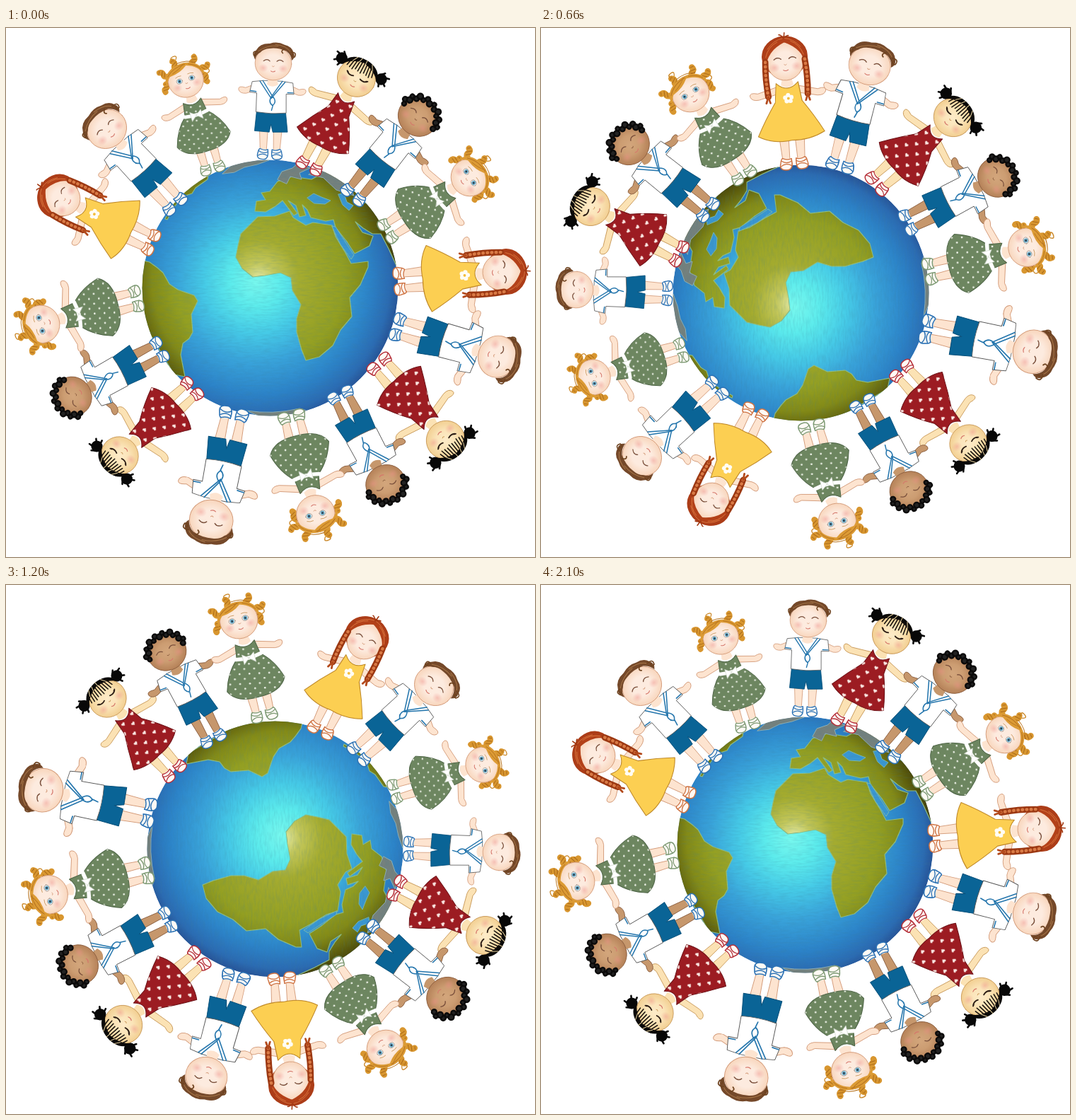
Write an HTML page that moves like this. It is 748x748 px and loops after 2.4 s.

```html
<!DOCTYPE html>
<html lang="en">
<head>
<meta charset="utf-8">
<title>Children around the world</title>
<style>
  html, body { margin: 0; width: 100%; height: 100%; overflow: hidden; background: #fff; }
  svg { display: block; width: 100vw; height: 100vh; transform-origin: 50% 50%; }
</style>
</head>
<body>
<svg id="world" viewBox="0 0 748 748" xmlns="http://www.w3.org/2000/svg" stroke-linecap="round" stroke-linejoin="round"></svg>
<script>
const FAIR = { skin: '#fde4d0', edge: '#d39a78', face: 'url(#fairFace)' };
const PALE = { skin: '#fbe2b4', edge: '#c99a5a', face: 'url(#paleFace)' };
const DARK = { skin: '#c6976c', edge: '#8d6040', face: 'url(#darkFace)' };

const path = (d, fill, stroke = 'none', width = 1, extra = '') =>
  `<path d="${d}" fill="${fill}" stroke="${stroke}" stroke-width="${width}" ${extra}/>`;
const line = (d, stroke, width = 1, extra = '') => path(d, 'none', stroke, width, extra);
const oval = (x, y, rx, ry, fill, extra = '') =>
  `<ellipse cx="${x}" cy="${y}" rx="${rx}" ry="${ry}" fill="${fill}" ${extra}/>`;
const both = draw => draw(-1) + draw(1);

// Dolls stand with their shoes at the origin and the head centre at (0,-130).
const legs = ({ skin, edge }, shoe) => both(s =>
  path(`M${s * 4} -36L${s * 5} -5H${s * 14}L${s * 16} -36Z`, skin, edge, .8) +
  path(`M${s * 3} -6Q${s * 1} 8 ${s * 9} 8Q${s * 20} 8 ${s * 17} -1Q${s * 16} -7 ${s * 14} -7`, '#fffaf5', shoe, 1.4) +
  line(`M${s * 3} -3Q${s * 9} 1 ${s * 16} -4M${s * 3} 3Q${s * 10} -2 ${s * 17} 3M${s * 3} -6Q${s * 8} -4 ${s * 14} -7`, shoe, 1.2));

const arms = ({ skin, edge }, from, drop) => both(s =>
  path(`M${s * from} -98L${s * 38} ${-97 + drop}Q${s * 49} ${-100 + drop} ${s * 48} ${-94 + drop}Q${s * 46} ${-88 + drop} ${s * 37} ${-89 + drop}L${s * from} -89Z`, skin, edge, .8));

const closedEye = s => line(`M${s * 5} -132Q${s * 9} -136 ${s * 14} -132`, '#7a503c', 1.2);
const lashedEye = s => line(`M${s * 5} -130Q${s * 10} -128 ${s * 14} -131M${s * 13} -131l${s * 2} -1`, '#2b1c14', 1.7);
const blueEye = s =>
  oval(s * 9, -130, 4.2, 3.4, '#fff', 'stroke="#8b7a70" stroke-width=".6"') +
  oval(s * 9, -130, 2.8, 2.9, '#6ba9c4') + oval(s * 9, -130, 1.2, 1.3, '#234') +
  line(`M${s * 5} -137Q${s * 9} -138 ${s * 13} -136`, '#c58d4c', .7);

const head = ({ skin, edge, face }, rx = 26, eye = closedEye) =>
  path('M-5 -112H5L8 -99Q0 -93 -8 -99Z', skin) +
  oval(0, -129, rx, 24, face, `stroke="${edge}" stroke-width=".8"`) +
  both(s => oval(s * 14, -122, 7, 6, 'url(#blush)') + eye(s)) +
  line('M-1.5 -125Q0 -123 1.5 -125', edge, .8) +
  line('M-3 -118Q0 -116 3 -118', '#d5776b', 1);

const boy = (tone, hair) =>
  legs(tone, '#2d73b5') + arms(tone, 26, 4) +
  path('M-21 -62L-23 -32L-2 -31L0 -42L3 -31L24 -32L20 -62Z', '#0a6496', '#064e78', .8) +
  path('M-13 -104L-29 -102L-32 -87L-22 -86L-22 -59Q0 -56 21 -59L20 -86L31 -86L29 -102L13 -104Z', '#fff', '#555', .8) +
  line('M-14 -104L0 -83L14 -104M-18 -103L-1 -79L18 -103M0 -83Q-6 -74 1 -69Q8 -74 1 -82M2 -70L0 -62M-31 -89L-23 -88M30 -88L22 -88', '#2576ad', 1.4) +
  head(tone) + hair;

const brownHair =
  path('M-26 -133Q-31 -141 -25 -147Q-20 -157 -6 -157Q5 -161 15 -156Q25 -154 28 -146Q32 -139 26 -134Q25 -142 18 -147Q6 -152 -6 -150Q-15 -149 -19 -144Q-25 -141 -26 -133Z', '#75492a') +
  line('M-23 -145Q-10 -155 6 -154M2 -156Q18 -155 24 -146', '#a97748', .9) +
  line('M24 -146Q34 -146 30 -139Q25 -138 27 -143M-23 -145Q-31 -146 -28 -139Q-24 -139 -26 -143M15 -150Q9 -147 13 -144', '#6d421f', 1.5);

const ringOfHair = Array.from({ length: 17 }, (_, i) => {
  const a = Math.PI * (1.03 + i * .06), out = 24.5 + i % 2 * 3.5;
  const x = out * Math.cos(a), y = -129 + (out - 2) * Math.sin(a);
  return `<circle cx="${x}" cy="${y}" r="${2.6 + i % 3 * .5}"/>`;
}).join('');
const blackCurls = `<g fill="#222" stroke="#0b0a0a" stroke-width="2.2">${ringOfHair}</g>`;

const dressed = (tone, shoe, dress, drop) => legs(tone, shoe) + arms(tone, 11, drop) + dress;

const redDress = 'M-12 -101Q0 -87 12 -101L15 -80Q28 -60 37 -38Q20 -27 0 -29Q-22 -27 -38 -37Q-27 -60 -15 -80Z';
const redGirl = dressed(PALE, '#b5303a',
  path(redDress, '#9c1c22', '#6f1318') + path(redDress, 'url(#hearts)'), 6) +
  both(s => oval(s * 29, -143, 7.5, 7.5, '#080808') +
    line(`M${s * 27} -149l${s * 3} -3M${s * 33} -147l${s * 5} -1M${s * 33} -140l${s * 4} 3M${s * 28} -138l${s * 2} 5`, '#080808', 2.4)) +
  head(PALE, 25, lashedEye) +
  path('M-25 -137C-25 -162 25 -162 25 -137Q18 -148 0 -151Q-18 -148 -25 -137Z', '#0a0908') +
  line([-19, -15, -11, -7, -3, 1, 5, 9, 13, 17].map((x, i) => `M${x * .85} -151L${x} ${-139 + i % 3}`).join(''), '#15100c', 1.4) +
  line('M-15 -147L-11 -154M-7 -149L-5 -155M14 -147L10 -154M2 -150V-156', '#e8d3a0', .9);

const greenDress = 'M-13 -99Q0 -88 13 -99L16 -80Q32 -66 39 -42Q30 -24 0 -25Q-30 -24 -39 -42Q-32 -66 -16 -80Z';
const ringlet = ([x, y, turn]) => `<g transform="translate(${x} ${y}) rotate(${turn})">` +
  line('M-1 5Q-3 2 0 0Q3 -3 0 -6', '#d8962f', 8) + line('M-3 3L3 1M-3 -1L4 -3M-2 -6L2 -7', '#a8681a', .9) + '</g>';
const greenGirl = dressed(FAIR, '#7d9a74',
  path(greenDress, '#6d8660', '#4f6647') + path(greenDress, 'url(#dots)') +
  line('M-17 -80Q0 -76 17 -80', '#fff', 5) +
  path('M0 -78L-8 -84V-71ZM0 -78L8 -84V-71Z', '#fff', '#cfd8ca', .6), 7) +
  [[-28, -146, -50], [-30, -126, 15], [-9, -154, -15], [18, -152, 25], [30, -139, 65], [28, -124, -15]].map(ringlet).join('') +
  head(FAIR, 25, blueEye) +
  path('M-28 -127C-33 -161 32 -163 28 -128Q23 -144 6 -149Q-4 -141 -20 -140Q-25 -136 -28 -127Z', '#dc9b35') +
  line('M-23 -141Q-12 -152 5 -151M-15 -143Q-4 -146 3 -152M10 -150Q21 -146 25 -138M-6 -155Q10 -157 20 -149', '#b87420', .9) +
  line('M-8 -159q-7 -6 0 -7t3 5M32 -130q5 -1 3 -5', '#c98524', 1.2);

const yellowDress = 'M-14 -102Q0 -88 14 -102L17 -78Q31 -58 42 -37Q23 -27 0 -29Q-24 -26 -42 -37Q-31 -58 -17 -78Z';
const petals = Array.from({ length: 5 }, (_, i) => {
  const a = i * Math.PI * .4 - Math.PI / 2;
  return oval(4 * Math.cos(a), -82 + 4 * Math.sin(a), 2.8, 2.8, '#fffdf5');
}).join('') + oval(0, -82, 1.7, 1.7, '#f3bd3c');
const braid = s => {
  const d = `M${s * 25} -130Q${s * 27} -108 ${s * 25} -86`;
  return line(d, '#9c3812', 8) + line(d, '#d97a45', 4, 'stroke-dasharray=".5 5"') +
    line(`M${s * 25} -86l-3 8M${s * 25} -86l2 8`, '#b34a1c', 2.5);
};
const yellowGirl = dressed(FAIR, '#cf7444',
  path(yellowDress, '#fccf52', '#c08a2a') + petals, 6) +
  oval(0, -135, 29, 26, '#ac3d18') + head(FAIR, 23) +
  path('M-25 -122C-32 -168 32 -168 25 -122Q25 -142 1 -153Q-22 -144 -25 -122Z', '#b34119') +
  line('M-21 -146Q-12 -157 -1 -158M21 -146Q12 -157 2 -158M-24 -136Q-20 -149 -8 -154M24 -136Q20 -149 9 -154', '#d9763f', .8) +
  line('M0 -159q-3 -4 -5 -4M1 -159l1 -6M2 -159q4 -3 5 -2', '#a23812', 1.5) +
  both(braid);

const dolls = { boy: boy(FAIR, brownHair), dark: boy(DARK, blackCurls), red: redGirl, green: greenGirl, yellow: yellowGirl };

// Kind, head centre, point between the shoes.
const ring = [
  ['boy', 378, 49, 373, 178], ['red', 496, 70, 429, 195], ['dark', 583, 125, 491, 236],
  ['green', 656, 211, 540, 287], ['yellow', 702, 345, 557, 358], ['boy', 696, 465, 554, 423],
  ['red', 622, 583, 528, 475], ['dark', 537, 645, 473, 519], ['green', 438, 688, 404, 550],
  ['boy', 290, 697, 322, 546], ['red', 160, 605, 263, 510], ['dark', 94, 521, 217, 455],
  ['green', 49, 419, 184, 383], ['yellow', 78, 240, 205, 303], ['boy', 142, 142, 239, 249],
  ['green', 254, 73, 292, 198]
];
const place = ([kind, hx, hy, fx, fy]) => {
  const dx = hx - fx, dy = hy - fy;
  const turn = Math.atan2(dx, -dy) * 180 / Math.PI;
  return `<use href="#${kind}" transform="translate(${fx} ${fy}) rotate(${turn}) scale(${Math.hypot(dx, dy) / 130})"/>`;
};

const land = {
  africa: 'M356 267L380 266L401 259L406 268L414 273L424 279L434 275L461 279L466 295L480 318L488 333L512 330L512 338L501 363L486 381L489 408L473 427L462 449L443 465L424 470L418 455L411 430L411 411L417 391L405 371L403 353L388 346L366 350L349 352L334 340L325 324L328 308L332 291L344 279Z',
  eurasia: 'M352 259L354 245L367 243L361 233L373 231L384 217L405 210L432 214L458 200L500 212L560 270L556 345L541 312L530 291L518 291L505 283L494 274L504 289L519 294L514 308L493 319L482 302L466 282L463 271L452 273L431 268L426 257L419 250L424 265L415 267L410 251L399 244L412 262L407 265L391 244L381 252L367 260Z',
  southAmerica: 'M190 328L203 331L214 339L222 346L231 362L243 370L266 378L271 386L262 405L264 430L259 439L250 446L247 462L253 493L238 490L190 410Z',
  northAmerica: 'M225 270L236 249L263 221L286 207L285 214L268 226L263 234L250 238L238 253L228 271Z'
};
const ice = 'M306 206L319 194L350 183L372 187L355 193L337 197L323 204ZM384 214L390 203L405 198L412 192L430 198L415 205L418 214L402 210L397 220ZM428 207L447 197L482 212L492 237L467 229L449 212ZM340 541Q377 547 415 538L438 545L373 555Z';
const water = 'M426 240L435 234L446 239L459 244L451 249L436 248ZM470 235L478 234L482 246L491 251L485 258L476 250ZM500 236L510 241L514 251L506 246ZM461 280L466 281L484 309L492 321L488 327L473 306Z';

const stops = list => list.map(([at, color]) => `<stop offset="${at}" stop-color="${color}"/>`).join('');
const glow = (id, x, y, r, list) =>
  `<radialGradient id="${id}" gradientUnits="userSpaceOnUse" cx="${x}" cy="${y}" r="${r}">${stops(list)}</radialGradient>`;
const soft = (id, ...colors) =>
  `<radialGradient id="${id}">${stops(colors.map((c, i) => [i / (colors.length - 1), c]))}</radialGradient>`;

const defs = `<defs>
  ${glow('sea', 354, 358, 205, [[0, '#78f8ee'], [.18, '#5cebec'], [.36, '#46cbe7'], [.56, '#39a3da'], [.78, '#2c83c8'], [.92, '#2b6bb2'], [1, '#264f92']])}
  ${glow('soil', 358, 356, 200, [[0, '#e2e8a4'], [.12, '#c3c75a'], [.28, '#a5ac30'], [.6, '#939f22'], [.76, '#838a17'], [.9, '#5a5a0c'], [1, '#3b3608']])}
  ${soft('fairFace', '#fdebdf', '#fdebdf', '#f8d6bd')}
  ${soft('paleFace', '#fdebc8', '#fbe4b8', '#f2cf92')}
  ${soft('darkFace', '#d3a67c', '#cc9d72', '#b58158')}
  ${soft('blush', '#ee8f8870', '#ee8f8800')}
  <clipPath id="ball"><circle cx="373.5" cy="367.5" r="181"/></clipPath>
  <filter id="grain" x="0" y="0" width="1" height="1">
    <feTurbulence type="fractalNoise" baseFrequency=".08 .4" numOctaves="2" seed="4"/>
    <feColorMatrix values="0 0 0 0 .05  0 0 0 0 .2  0 0 0 0 .3  1.6 0 0 0 -.65"/>
  </filter>
  <pattern id="dots" width="13" height="13" patternUnits="userSpaceOnUse" patternTransform="rotate(12)">
    <circle cx="3" cy="3" r="1.2" fill="#f4f7ee"/><circle cx="9.5" cy="9.5" r="1.2" fill="#f4f7ee"/>
  </pattern>
  <pattern id="hearts" width="18" height="19" patternUnits="userSpaceOnUse" patternTransform="rotate(-8)">
    ${['5 4', '14 13.5'].map(p => `<path transform="translate(${p})" d="M0 3L-2.7 0Q-2 -3 0 -1Q2 -3 2.7 0Z" fill="#fbe9e4"/>`).join('')}
  </pattern>
  ${Object.entries(dolls).map(([id, art]) => `<g id="${id}">${art}</g>`).join('')}
</defs>`;

const globe = `<g clip-path="url(#ball)">
  <circle cx="373.5" cy="367.5" r="181" fill="url(#sea)"/>
  ${Object.values(land).map(d => path(d, 'url(#soil)', '#8fbd83', 1.2)).join('')}
  ${path(ice, '#75817d', '#8fb0b5')}${path(water, '#3a97d2', '#79b7ad')}
  <rect x="192" y="186" width="363" height="363" filter="url(#grain)" opacity=".22"/>
</g>`;

const world = document.getElementById('world');
world.innerHTML = defs + globe + ring.map(place).join('');

const LOOP = 2400;
const poses = [[0, 0], [300, -90], [900, 0], [1200, 90], [1500, 180], [1800, -90], [2100, 0], [LOOP, 0]];
world.animate(
  poses.map(([at, deg]) => ({ offset: at / LOOP, transform: `rotate(${deg}deg)`, easing: 'step-end' })),
  { duration: LOOP, iterations: Infinity });
</script>
</body>
</html>
```
